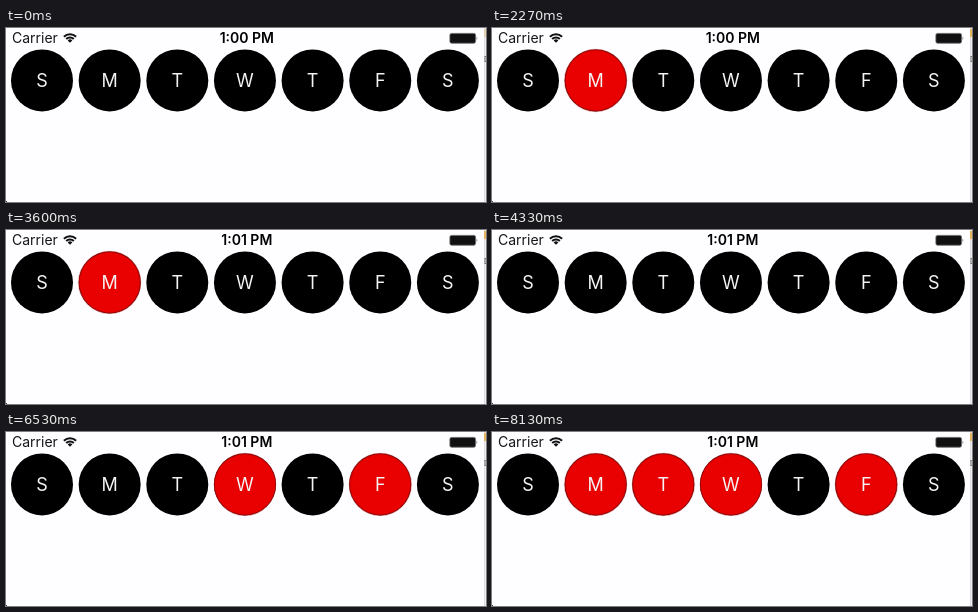
These frames come from a looping animation (480 px wide and 174 px high, 8190 ms). An HTML page:

```html
<!DOCTYPE html>
<html lang="en">
<head>
<meta charset="utf-8">
<title>Weekday picker</title>
<style>
html, body { margin: 0; width: 100%; height: 100%; overflow: hidden; background: #fefdff; }
svg { display: block; width: 480px; height: 174px; }
text { font-family: Inter, "Liberation Sans", sans-serif; text-anchor: middle; }
.status { font-size: 14px; fill: #161616; }
.clock { font-weight: 600; fill: #000; }
.day text { font-size: 18px; fill: #f4f4f4; }
.on { fill: #e90000; stroke: #a80808; stroke-width: .8; }
.on, .clock, .tab { animation: 8190ms step-end infinite; }
.on { opacity: 0; }

/* percent = time / 8190 ms */
.mon { animation-name: mon; }
.tue { animation-name: tue; }
.wed { animation-name: wed; }
.fri { animation-name: fri; }
.before { animation-name: before; }
.after { animation-name: after; }
.tab { animation-name: tab; }
@keyframes mon { 0% { opacity: 0 } 16.239% { opacity: 1 } 50.427% { opacity: 0 } 80.586% { opacity: 1 } 100% { opacity: 1 } }
@keyframes tue { 0% { opacity: 0 } 29.304% { opacity: 1 } 43.101% { opacity: 0 } 87.912% { opacity: 1 } 100% { opacity: 1 } }
@keyframes wed { 0% { opacity: 0 } 62.637% { opacity: 1 } 100% { opacity: 1 } }
@keyframes fri { 0% { opacity: 0 } 70.818% { opacity: 1 } 100% { opacity: 1 } }
@keyframes before { 0% { opacity: 1 } 40.659% { opacity: 0 } 100% { opacity: 0 } }
@keyframes after { 0% { opacity: 0 } 40.659% { opacity: 1 } 100% { opacity: 1 } }
@keyframes tab { 0% { opacity: .4 } 2.442% { opacity: 1 } 100% { opacity: 1 } }
</style>
</head>
<body>
<svg viewBox="0 0 480 174">
  <text class="status" x="6" y="15.4" style="text-anchor:start">Carrier</text>
  <g transform="translate(64 14.8)" fill="none" stroke="#111" stroke-width="2">
    <path d="M-6.1-6.1A8.6 8.6 0 0 1 6.1-6.1M-3.8-3.8A5.3 5.3 0 0 1 3.8-3.8"/>
    <path d="M0 0L-2.3-2.3A3.2 3.2 0 0 1 2.3-2.3Z" fill="#111" stroke="none"/>
  </g>
  <text class="status clock before" x="240.8" y="15.4">1:00 PM</text>
  <text class="status clock after" x="240.8" y="15.4">1:01 PM</text>
  <rect x="443.9" y="5.4" width="25.6" height="9.8" rx="1.6" fill="#111" stroke="#666" stroke-width=".8"/>
  <path d="M470.7 8.2q1.4 2.1 0 4.2z" fill="#333"/>

  <g id="days"></g>

  <path d="M478.5 0V174" stroke="#dedee2"/>
  <path d="M479.5 0V174" stroke="#eeeef0"/>
  <path class="tab" d="M479 1V9" stroke="#e5b45f" stroke-width="2"/>
  <path d="M478.5 28.5h1.5M478.5 33.5h1.5M479 28.5v5" stroke="#777"/>
  <path d="M0 173h1v1h-1z" fill="#444"/>
</svg>
<script>
const days = [["S"], ["M", "mon"], ["T", "tue"], ["W", "wed"], ["T"], ["F", "fri"], ["S"]];
const disc = (cls, r) => `<circle class="${cls}" r="${r}"/>`;
document.getElementById("days").innerHTML = days.map(([letter, key], i) =>
  `<g class="day" transform="translate(${36 + i * 67.65} 52.4)">
    ${disc("off", 31)}${key ? disc("on " + key, 30.7) : ""}
    <text y="6.5">${letter}</text>
  </g>`).join("");
</script>
</body>
</html>
```
